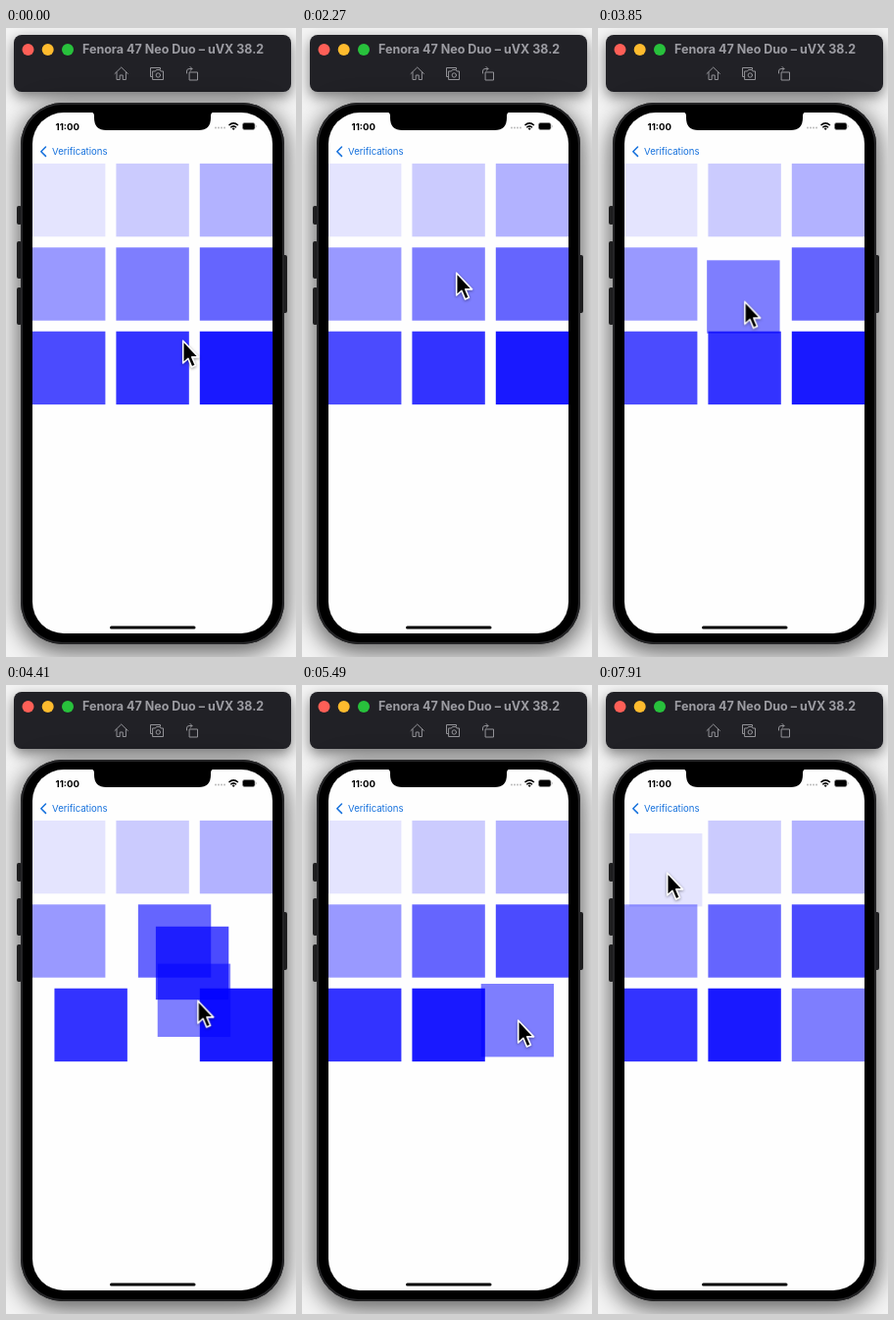
Recreate the animation shown at these times as an HTML page. Size 296 by 640 pixels, loop 8 s.

```html
<!DOCTYPE html>
<html lang="en">
<head>
<meta charset="utf-8">
<title>Reordering tiles</title>
<style>
html, body { margin: 0; width: 100%; height: 100%; overflow: hidden; }
body { position: relative; background: #f4f4f4; font-family: Inter, Roboto, sans-serif; }
div, svg { position: absolute; }

.bar {
  left: 8px; top: 7px; width: 283px; height: 58px; border-radius: 8px;
  background: #212126; box-shadow: 0 5px 14px rgba(0, 0, 0, .5);
}
.phone {
  left: 15px; top: 76px; width: 269px; height: 551px; border-radius: 43px;
  background: #000; box-shadow: inset 0 0 0 2px #242426, 0 6px 24px 3px rgba(0, 0, 0, .6);
}
.button { width: 5px; border-radius: 2px; background: #2c2c2e; }
.screen {
  left: 27px; top: 86px; width: 245px; height: 530px; border-radius: 32px;
  background: #fefefe;
}
.layer, .cursor { left: 0; top: 0; overflow: visible; }

.tile {
  width: 74.4px; height: 74.4px;
  translate: var(--from);
  fill: rgb(0 0 255 / var(--alpha));
}
.early { animation: early 8s ease-in-out infinite; }
.late { animation: late 8s ease-in-out infinite; }
.dragged { animation: drag 8s linear infinite; }
.lifted { animation: lift 8s ease-out infinite; }
.cursor { animation: point 8s linear infinite; filter: drop-shadow(0 1px 1.5px rgba(0, 0, 0, .4)); }

@keyframes early {
  0%, 52.3% { translate: var(--from); }
  56.7%, 100% { translate: var(--to); }
}
@keyframes late {
  0%, 58.7% { translate: var(--from); }
  63.1%, 100% { translate: var(--to); }
}
@keyframes drag {
  0%, 44% { translate: var(--from); }
  48.1% { translate: 111px 236px; }
  52.3% { translate: 129px 270px; }
  55.1% { translate: 154.5px 283.5px; }
  59% { translate: 178px 297px; }
  68.6%, 70.6% { translate: 182.7px 304px; animation-timing-function: ease-in-out; }
  74.6%, 100% { translate: var(--to); }
}
@keyframes lift {
  0%, 93.7% { translate: var(--from); }
  98.8%, 100% { translate: 32px 151px; }
}
@keyframes point {
  0%, 3% { translate: 180px 317px; animation-timing-function: ease-in-out; }
  24%, 28.4% { translate: 157px 248px; animation-timing-function: ease-in-out; }
  36%, 45% { translate: 149px 265px; }
  48.1% { translate: 149px 277px; }
  52.3% { translate: 168px 308px; }
  55.1% { translate: 195px 320px; }
  59% { translate: 216px 334px; }
  68.6%, 71.5% { translate: 220px 340px; animation-timing-function: ease-in-out; }
  80.5%, 92% { translate: 70px 184px; }
  98.8%, 100% { translate: 70px 190px; }
}
</style>
</head>
<body>
<div class="bar"></div>
<div class="button" style="left:11px;top:181px;height:19px"></div>
<div class="button" style="left:11px;top:217px;height:38px"></div>
<div class="button" style="left:11px;top:264px;height:38px"></div>
<div class="button" style="left:282px;top:231px;height:59px"></div>
<div class="phone"></div>
<div class="screen"></div>

<svg class="layer" width="296" height="640">
  <circle cx="22.5" cy="22" r="6" fill="#fe5f57"/>
  <circle cx="42.7" cy="22" r="6" fill="#febb2e"/>
  <circle cx="63" cy="22" r="6" fill="#28c13c"/>
  <text x="78" y="26" font-size="12.5" font-weight="700" fill="#9c9ca2">Fenora 47 Neo Duo – uVX 38.2</text>

  <g fill="none" stroke="#929297" stroke-linejoin="round" stroke-linecap="round">
    <path d="M111 46.5l6.7-6.5 6.7 6.5M113 45v7.5h3.2V48h3v4.5h3.2V45"/>
    <path d="M149.5 49.5h-2v-9h10v1.5"/>
    <path d="M150 44h2.5l1-1.5h3.5l1 1.5h2.5v8.5h-10.5z"/>
    <circle cx="155.3" cy="48" r="2.2"/>
    <path d="M187.5 45h8v8h-8zM184.5 46v-2q0-2.5 2.5-2.5h3M188 39.5l2 2-2 2"/>
  </g>

  <path d="M86 85.5q4 0 4 4v2q0 12.5 12.5 12.5h94q12.500 0 12.500-12.500v-2q0-4 4-4z"/>
  <text x="50.5" y="103.5" font-size="9.6" font-weight="700">11:00</text>
  <g fill="#b4b4b4">
    <circle cx="214" cy="101.5" r=".9"/><circle cx="217" cy="101.5" r=".9"/>
    <circle cx="220" cy="101.5" r=".9"/><circle cx="223" cy="101.5" r=".9"/>
  </g>
  <path d="M227.5 99q4.700-4.200 9.400 0M229.300 101.200q2.900-2.600 5.800 0" fill="none" stroke="#000" stroke-width="1.5"/>
  <path d="M230.7 102.2q1.500-1.200 3 0l-1.500 1.800z"/>
  <rect x="241.5" y="96.5" width="12.5" height="7" rx="2" stroke="#8c8c8c" stroke-width=".7"/>
  <path d="M255 98.800q1.300 1.200 0 2.400z" fill="#8c8c8c"/>

  <path d="M40.5 121l-4.700 4.700 4.700 4.700" fill="none" stroke="#1470dc" stroke-width="1.5" stroke-linecap="round" stroke-linejoin="round"/>
  <text x="47" y="129" font-size="9.6" fill="#1470dc">Verifications</text>
  <rect x="106" y="608.5" width="87.5" height="3" rx="1.5"/>
</svg>

<svg class="layer" id="tiles" width="296" height="640"></svg>

<svg class="cursor" width="18" height="30">
  <path transform="translate(.7 1.2) scale(1.06)" d="M0 0V21.500L4.900 17 8.300 25.200 12 23.600 8.600 15.700H15z" stroke="#fff" stroke-width="1.5" stroke-linejoin="round"/>
</svg>

<script>
const cell = n => `${27 + 85.4 * (n % 3)}px ${137.9 + 85.4 * Math.floor(n / 3)}px`;
const motion = { 0: "lifted", 4: "dragged", 5: "early", 6: "early", 7: "early", 8: "late" };
const tiles = document.getElementById("tiles");

for (let n = 0; n < 9; n++) {
  const tile = document.createElementNS(tiles.namespaceURI, "rect");
  tile.setAttribute("class", `tile ${motion[n] || ""}`);
  tile.style.setProperty("--alpha", (n + 1) / 10);
  tile.style.setProperty("--from", cell(n));
  tile.style.setProperty("--to", cell(n === 4 ? 8 : n - 1));
  tiles.append(tile);
}
</script>
</body>
</html>
```
